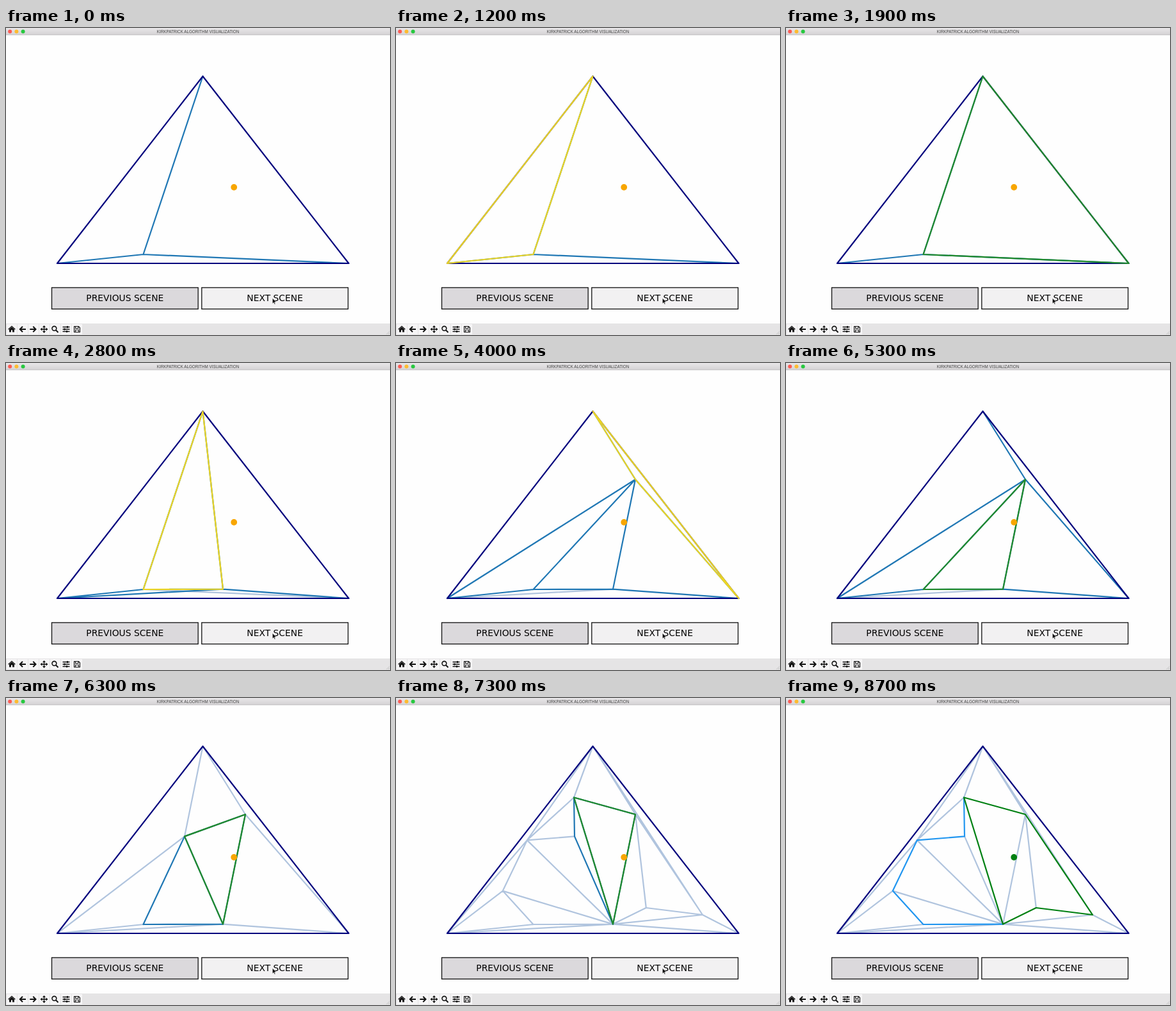
Animation of 600x480 px, one loop 9300 ms. Source, as an HTML page:

```html
<!DOCTYPE html>
<html lang="en">
<head>
<meta charset="utf-8">
<title>Point location</title>
<style>
  html, body { margin: 0; width: 100%; height: 100%; overflow: hidden; background: #fefefe; }
  svg { display: block; width: 600px; height: 480px; }
  .title { font: 6.3px "Liberation Sans", Arial, sans-serif; fill: #444; text-anchor: middle; }
  .label { font: 13.87px "DejaVu Sans", sans-serif; fill: #000; text-anchor: middle; }
  .btn { stroke: #111; stroke-width: 1.3; }
  #mesh path { fill: none; stroke-width: 2.2; stroke-linecap: round; stroke-linejoin: round; }
  .icon { fill: none; stroke: #111; stroke-width: 1.3; }
  .solid { fill: #111; stroke: none; }
</style>
</head>
<body>
<svg viewBox="0 0 600 480" xmlns="http://www.w3.org/2000/svg">
  <defs>
    <linearGradient id="bar" x1="0" y1="0" x2="0" y2="1">
      <stop offset="0" stop-color="#e9e7e9"/>
      <stop offset="1" stop-color="#d3d1d3"/>
    </linearGradient>
  </defs>
  <rect width="600" height="480" fill="#fefefe"/>
  <rect width="600" height="11" fill="url(#bar)"/>
  <rect y="10.5" width="600" height=".7" fill="#bdbbbd"/>
  <circle cx="6.2" cy="5.5" r="3" fill="#fc5b54"/>
  <circle cx="16.4" cy="5.5" r="3" fill="#fdbb2f"/>
  <circle cx="26.6" cy="5.5" r="3" fill="#28c840"/>
  <text class="title" x="300" y="7.9">KIRKPATRICK ALGORITHM VISUALIZATION</text>

  <g id="mesh">
    <path id="far" stroke="#b0c4de"/>
    <path id="near"/>
    <path id="hull" stroke="#00007d" d="M307.5 75.5L80 368H535.5Z"/>
    <path id="mark"/>
  </g>
  <circle id="dot" cx="356.2" cy="249" r="4.9"/>

  <rect class="btn" x="71.5" y="405.9" width="228.7" height="33.5" fill="#dbd9dc"/>
  <rect class="btn" x="305.8" y="405.9" width="228.7" height="33.5" fill="#f2f1f2"/>
  <text class="label" x="185.8" y="426.6">PREVIOUS SCENE</text>
  <text class="label" x="420.1" y="426.6">NEXT SCENE</text>
  <path d="M416.3 422.3V431L418.3 429.2L419.7 432.2L421 431.6L419.7 428.7H422.3Z" fill="#000" stroke="#fff" stroke-width=".6"/>

  <rect y="462" width="600" height="18" fill="#e5e4e5"/>
  <g fill="#f6f5f6">
    <rect x="1" y="463" width="16" height="16"/>
    <rect x="18" y="463" width="16" height="16"/>
    <rect x="35" y="463" width="16" height="16"/>
    <rect x="52" y="463" width="16" height="16"/>
    <rect x="69" y="463" width="16" height="16"/>
    <rect x="86" y="463" width="16" height="16"/>
    <rect x="103" y="463" width="16" height="16"/>
  </g>
  <path class="solid" d="M5 471L9 467.5L13 471V475.5H10V472.3H8V475.5H5Z"/>
  <path class="icon" d="M3.6 471.2L9 466.3L14.4 471.2"/>
  <path class="icon" style="stroke-width:2" d="M31 471H22M26 466.8L21.8 471L26 475.2"/>
  <path class="icon" style="stroke-width:2" d="M37.3 471H46.3M42.3 466.8L46.5 471L42.3 475.2"/>
  <path class="icon" d="M55 471H64M59.5 466.5V475.5"/>
  <path class="solid" d="M59.5 465L62 468H57ZM59.5 477L62 474H57ZM53.5 471L56.5 468.5V473.5ZM65.5 471L62.5 468.5V473.5Z"/>
  <circle class="icon" cx="75.4" cy="469.8" r="3.4" style="stroke-width:1.6"/>
  <path class="icon" style="stroke-width:2" d="M78 472.4L81.5 476"/>
  <path class="icon" d="M88.5 467.5H99.5M88.5 471H99.5M88.5 474.5H99.5"/>
  <path class="icon" style="stroke-width:2" d="M96 466V469M91.5 469.5V472.5M95 473V476"/>
  <path class="icon" d="M106.5 466.5H113.5L115.5 468.5V475.5H106.5ZM108.5 466.5V469.5H113V466.5M108.5 475.5V472H113.5V475.5" style="stroke-width:1.1"/>
  <path d="M594.5 479L599 474.5M597 479L599 477" stroke="#aaa" stroke-width=".6"/>
</svg>
<script>
const points = {
  A: [307.5, 75.5], B: [80, 368], C: [535.5, 368],
  P: [214.5, 354], Q: [339, 353.6], R: [374, 182], S: [279, 216.4],
  T: [278, 155.5], U: [204.8, 222.4], V: [390.8, 328], W: [479, 339], X: [166.8, 301.6]
};

// Each pair of letters is an edge; "near" edges bound the candidate faces.
const levels = [
  { near: 'AP BP CP', far: '' },
  { near: 'AP BP AQ PQ BQ CQ', far: 'PC' },
  { near: 'AR BR CR PR QR BP PQ CQ', far: 'BQ' },
  { near: 'PS PQ QS RS QR', far: 'AS BS AR CR BP BQ CQ' },
  { near: 'ST QS QT RT QR',
    far: 'AT AU AR AW BU BX BP BQ CQ CW TU SU UX PX PQ UQ XQ RW RV VQ VW QW' },
  { near: 'TS SU UX XP PQ',
    far: 'AT AU AR AW BU BX BP BQ CQ CW TU UQ XQ SQ RQ RV QW' }
];

const TEST = '#ecd524', FOUND = '#228b2c', DONE = '#008012';

// start time, level, highlighted face, its colour
const steps = [
  [0, 0], [1100, 0, 'ABP', TEST], [1400, 0, 'BPC', TEST], [1700, 0, 'APC', FOUND],
  [2100, 1], [2400, 1, 'BPQ', TEST], [2700, 1, 'APQ', TEST], [3000, 1, 'AQC', FOUND],
  [3300, 2], [3600, 2, 'ABR', TEST], [3900, 2, 'ARC', TEST], [4200, 2, 'BPR', TEST],
  [4500, 2, 'QRC', TEST], [4900, 2, 'PQR', FOUND],
  [5500, 3], [5800, 3, 'PQS', TEST], [6100, 3, 'QRS', FOUND],
  [6500, 4], [6800, 4, 'QST', TEST], [7100, 4, 'QRT', FOUND],
  [7500, 5, 'TRWVQ', DONE]
];

const LOOP = 9300;
const el = id => document.getElementById(id);
const trace = word => 'M' + [...word].map(k => points[k].join(' ')).join('L');
const edges = list => list ? list.split(' ').map(trace).join('') : '';

let shown = null;

function show(step) {
  const [, n, face, color] = step;
  const done = color === DONE;
  el('far').setAttribute('d', edges(levels[n].far));
  el('near').setAttribute('d', edges(levels[n].near));
  el('near').setAttribute('stroke', done ? '#2196f0' : '#1f77b4');
  el('mark').setAttribute('d', face ? trace(face) + 'Z' : '');
  el('mark').setAttribute('stroke', color || 'none');
  el('dot').setAttribute('fill', done ? DONE : '#f8a600');
}

function tick() {
  const t = performance.now() % LOOP;
  const step = steps.findLast(s => s[0] <= t);
  if (step !== shown) show(shown = step);
  requestAnimationFrame(tick);
}
tick();
</script>
</body>
</html>
```
